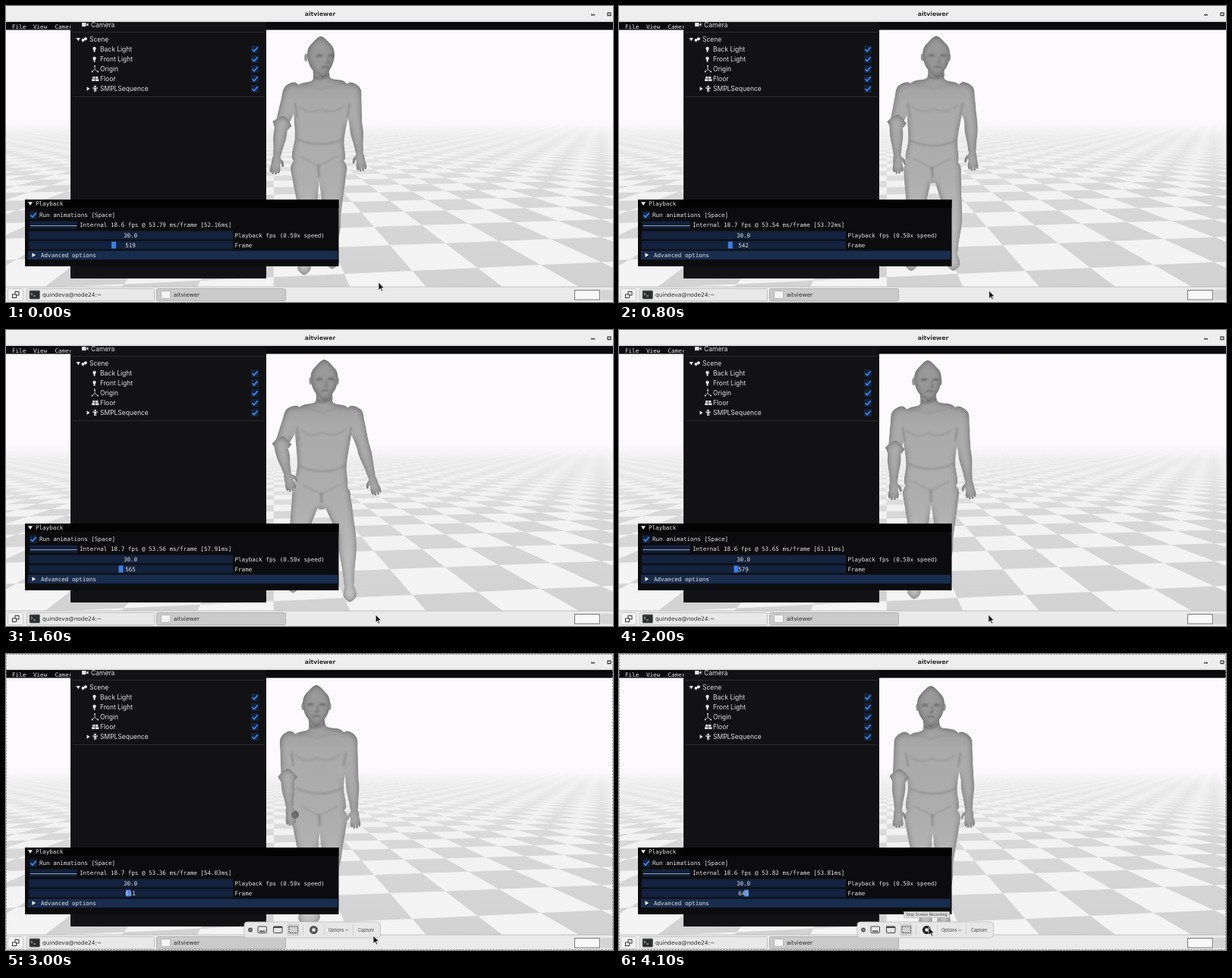
An HTML page for the animation above (4200 ms loop, 800x390 px).

```html
<!DOCTYPE html>
<html lang="en">
<head>
<meta charset="utf-8">
<title>aitviewer</title>
<style>
html, body { margin: 0; width: 100%; height: 100%; overflow: hidden; background: #fcfafc; }
svg { display: block; width: 800px; height: 390px; }
.mono { font: 7.57px "DejaVu Sans Mono", monospace; fill: #e6e6e6; }
.tree { font: 8.5px Inter, sans-serif; fill: #dedede; }
.desk { font: 7.4px "DejaVu Sans", sans-serif; fill: #2b2b2b; }
.bar { font: 5.6px Inter, sans-serif; fill: #444; }
</style>
</head>
<body>
<svg id="stage" viewBox="0 0 800 390" xmlns="http://www.w3.org/2000/svg"></svg>
<script>
const LOOP = 4200, STEP = 100;
const stage = document.getElementById('stage');

// ---------- markup helpers ----------
const text = (x, y, s, cls, extra = '') => `<text x="${x}" y="${y}" class="${cls}" ${extra}>${s}</text>`;
const box = (x, y, w, h, fill, extra = '') =>
  `<rect x="${x}" y="${y}" width="${w}" height="${h}" fill="${fill}" ${extra}/>`;
const line = (d, color, w = 1, extra = '') =>
  `<path d="${d}" fill="none" stroke="${color}" stroke-width="${w}" ${extra}/>`;
const shape = (d, fill, extra = '') => `<path d="${d}" fill="${fill}" ${extra}/>`;
const check = (x, y) => box(x, y, 10, 10, '#13233c') +
  line(`M${x + 1.6} ${y + 5.2}l2.4 2.6 4.6-5.6`, '#4088f0', 1.7);

// ---------- floor ----------
function floorPath() {
  const f = 470, high = 2.3, horizon = 140, yaw = 0.1;
  const c = Math.cos(yaw), s = Math.sin(yaw);
  let d = '';
  for (let v = 1; v < 60; v++) {
    for (let u = -55; u < 55; u++) {
      if ((u + v) & 1) continue;
      const pts = [[0, 0], [1, 0], [1, 1], [0, 1]].map(([a, b]) => {
        const z = (u + a) * s + (v + b) * c;
        const x = (u + a) * c - (v + b) * s;
        return [400 + f * x / z, horizon + f * high / z, z];
      });
      if (pts.some(p => p[2] < 2)) continue;
      if (pts.every(p => p[0] < 0) || pts.every(p => p[0] > 800)) continue;
      d += 'M' + pts.map(p => p[0].toFixed(1) + ' ' + p[1].toFixed(1)).join('L') + 'z';
    }
  }
  return d;
}

// ---------- static parts ----------
const defs = `<defs>
<linearGradient id="tile" gradientUnits="userSpaceOnUse" x1="0" y1="155" x2="0" y2="370">
  <stop offset="0" stop-color="#d9d9d9" stop-opacity="0"/><stop offset=".14" stop-color="#dadada" stop-opacity=".45"/>
  <stop offset=".4" stop-color="#d8d8d8"/><stop offset="1" stop-color="#d2d2d2"/></linearGradient>
<linearGradient id="ground" gradientUnits="userSpaceOnUse" x1="0" y1="150" x2="0" y2="370">
  <stop offset="0" stop-color="#fcfafc"/><stop offset=".1" stop-color="#f2f1f2"/><stop offset="1" stop-color="#f5f4f5"/></linearGradient>
<linearGradient id="skin" gradientUnits="userSpaceOnUse" x1="0" y1="40" x2="0" y2="350">
  <stop offset="0" stop-color="#9b9b9b"/><stop offset=".14" stop-color="#979797"/><stop offset=".27" stop-color="#aaa"/>
  <stop offset=".6" stop-color="#aeaeae"/><stop offset="1" stop-color="#c4c4c4"/></linearGradient>
<filter id="vol" x="-15%" y="-15%" width="130%" height="130%" color-interpolation-filters="sRGB">
  <feGaussianBlur in="SourceAlpha" stdDeviation="4" result="b"/>
  <feComposite in="SourceAlpha" in2="b" operator="arithmetic" k2="1" k3="-1"/>
  <feComponentTransfer result="rim"><feFuncA type="linear" slope=".42"/></feComponentTransfer>
  <feMerge><feMergeNode in="SourceGraphic"/><feMergeNode in="rim"/></feMerge></filter>
<filter id="soft" x="-40%" y="-40%" width="180%" height="180%"><feGaussianBlur stdDeviation="1.3"/></filter>
<clipPath id="view"><rect y="31" width="800" height="339"/></clipPath>
<clipPath id="panel"><rect x="85" y="21" width="258" height="338"/></clipPath>
<clipPath id="menu"><rect y="20" width="85" height="12"/></clipPath>
</defs>`;

const scene = box(0, 0, 800, 390, '#fcfafc') + `<g clip-path="url(#view)">` +
  box(0, 150, 800, 220, 'url(#ground)') + shape(floorPath(), 'url(#tile)') + `<g id="body"></g></g>`;

const titleBar = box(0, 0, 800, 20, '#efeeef') + box(0, 19.5, 800, 1, '#cfcfcf') +
  text(414, 13, 'aitviewer', 'desk', 'text-anchor="middle" style="font-weight:700;font-size:7.7px"') +
  box(771, 11, 5, 1.4, '#333') + '<rect x="793" y="9" width="4" height="3.6" fill="none" stroke="#333" stroke-width="1.2"/>' +
  box(0, 21, 800, 10.5, '#0b0b0d') +
  `<g clip-path="url(#menu)">${text(8, 29.5, 'File', 'mono')}${text(36, 29.5, 'View', 'mono')}${text(64.5, 29.5, 'Camera', 'mono')}</g>`;

const bulb = y => `<circle cx="116.5" cy="${y - 1}" r="2.2" fill="#e4e4e4"/>` + box(115.5, y + 1, 2, 2.6, '#e4e4e4');
const icons = {
  'Back Light': bulb, 'Front Light': bulb,
  'Origin': y => line(`M117 ${y - 4}v4.5l-3.6 3M117 ${y + .5}l4 3`, '#cfcfcf', .9) +
    [[117, -4], [113.6, 3.4], [121, 3.4]].map(p => `<circle cx="${p[0]}" cy="${y + p[1]}" r="1" fill="#ddd"/>`).join(''),
  'Floor': y => box(114, y - 3, 3.4, 2.7, '#e0e0e0') + box(118, y - 3, 3.4, 2.7, '#e0e0e0') +
    box(113, y + .3, 4.4, 2.7, '#e0e0e0') + box(118, y + .3, 4.4, 2.7, '#e0e0e0'),
  'SMPLSequence': y => `<circle cx="117.5" cy="${y - 3}" r="1.3" fill="#e4e4e4"/>` +
    line(`M114 ${y - .8}h7M117.5 ${y - 1}v2M116.6 ${y}v4M118.4 ${y}v4`, '#e4e4e4', 1.2) +
    shape(`M106.500 ${y - 2.7}l4 2.7-4 2.7z`, '#e4e4e4')
};
const tree = `<g clip-path="url(#panel)">` + box(85, 21, 258, 338, '#121114') +
  box(100, 22, 5.5, 5, '#e4e4e4') + shape('M105.500 24.500l3-2.300v4.600z', '#e4e4e4') + text(112, 27.5, 'Camera', 'tree') +
  box(88, 34, 252, .8, '#343338') +
  shape('M92.500 42h5.400l-2.700 4.300z', '#e4e4e4') +
  `<circle cx="101.500" cy="45" r="2" fill="#e4e4e4"/><circle cx="104.800" cy="43.300" r="2.100" fill="#e4e4e4"/>` +
  text(110, 47.2, 'Scene', 'tree') +
  Object.keys(icons).map((name, i) => {
    const y = 57 + i * 13;
    return icons[name](y) + text(124, y + 3.2, name, 'tree') + check(323, y - 5);
  }).join('') + box(88, 119, 252, .8, '#343338') + '</g>';

const playback = box(25, 255, 413.5, 88, '#0c0c0f') + box(25, 255, 413.5, 11, '#030304') +
  shape('M29 258.300h6l-3 4.600z', '#eee') + text(39, 263, 'Playback', 'mono') +
  check(31, 270.5) + text(44, 278.3, 'Run animations [Space]', 'mono') +
  box(31, 283.5, 63, 10, '#12203a') + line('M32 289.500h61', '#a9b3c2', .9) +
  `<text id="stats" x="97" y="291.400" class="mono"></text>` +
  box(30, 296.5, 269, 11, '#13223d') + text(164, 304.6, '30.0', 'mono', 'text-anchor="middle"') +
  text(301.5, 304.6, 'Playback fps (0.50x speed)', 'mono') +
  box(30, 309.5, 269, 11, '#13223d') + `<rect id="knob" y="310.500" width="6" height="9" fill="#3d7fe6"/>` +
  `<text id="count" x="164" y="317.700" class="mono" text-anchor="middle"></text>` +
  text(301.5, 317.7, 'Frame', 'mono') +
  box(29, 322.5, 408, 11.5, '#182d4d') + shape('M34.500 325.200l4.600 2.900-4.600 2.900z', '#eee') +
  text(46, 330.8, 'Advanced options', 'mono');

const taskBar = box(0, 370, 800, 20, '#ebeaeb') + box(0, 369.5, 800, 1, '#c2c2c2') +
  '<rect x="2.500" y="372.500" width="20" height="16" rx="2" fill="#f3f3f3" stroke="#c9c9c9"/>' +
  '<rect x="12" y="376.500" width="5" height="4.500" fill="none" stroke="#333"/><rect x="8.500" y="380" width="5" height="4.500" fill="#fff" stroke="#333"/>' +
  '<rect x="27.500" y="372.500" width="168" height="16" rx="2" fill="#e9e8e9" stroke="#c4c4c4"/>' +
  '<rect x="31" y="375" width="13.500" height="11" rx="1" fill="#2b2d2e" stroke="#777" stroke-width=".8"/>' +
  line('M33 378l2 1.500-2 1.500M36 382h3', '#ddd', .8) +
  text(48, 383.3, 'quindeva@node24:~', 'desk') +
  '<rect x="198.500" y="372.500" width="170" height="16" rx="2" fill="#cbcacb" stroke="#b0b0b0"/>' +
  '<rect x="204.500" y="375.500" width="12" height="10" rx="1" fill="#f4f4f4" stroke="#aaa" stroke-width=".8"/>' +
  text(221, 383.3, 'aitviewer', 'desk') +
  '<rect x="749.500" y="374.500" width="33" height="12.500" fill="#f8f8f8" stroke="#777"/>' +
  box(784, 374, 16, 13.5, '#d4d4d4');

const recorder = `<g id="recorder"><rect x=".5" y=".5" width="799" height="389" fill="none" stroke="#8a8a8a" stroke-width="1" stroke-dasharray="2 2"/>
<rect x="314" y="353" width="179.500" height="21" rx="4" fill="#e8e7e8" stroke="#bcbcbc" stroke-width=".8"/>
<circle cx="322" cy="363.500" r="2.900" fill="#555"/>` + line('M321 362.500l2 2m0-2l-2 2', '#eee', .7) +
  box(370.5, 355.5, 16, 16, '#d0d0d0', 'rx="2"') +
  '<g fill="none" stroke="#444"><rect x="332" y="359" width="11.500" height="8.500" rx="1"/><rect x="352.500" y="359" width="11.500" height="8.500" rx="1"/>' +
  '<rect x="373" y="359" width="11.500" height="8.500" stroke-dasharray="2 1.200"/></g>' +
  box(334, 364.5, 7.5, 1.6, '#444') + box(352.5, 359, 11.5, 2, '#444') +
  box(391, 356, .7, 15, '#c4c4c4') + box(419, 356, .7, 15, '#c4c4c4') + box(457, 356, .7, 15, '#c4c4c4') +
  `<circle id="stop" cx="405.500" cy="363.500" r="5.500"/>` + box(403.5, 361.5, 4, 4, '#eee') +
  text(425, 365.6, 'Options', 'bar') + line('M447.500 363l1.600 1.600 1.600-1.600', '#555', .8) + text(464, 365.6, 'Capture', 'bar') +
  `<g id="tip">${box(375.5, 339.5, 60, 8, '#dcdbdc', 'stroke="#aaa" stroke-width=".5"')}
  ${text(405.5, 345.4, 'Stop Screen Recording', 'bar', 'text-anchor="middle" style="font-size:5px"')}</g></g>`;

const pointer = `<path id="pointer" d="M0 0v10.500l2.400-2.200 1.700 3.700 1.600-.7-1.700-3.600h3.300z" fill="#111" stroke="#fff" stroke-width=".7"/>`;

stage.innerHTML = defs + scene + titleBar + tree + playback + taskBar + recorder + pointer;
const el = id => document.getElementById(id);

// ---------- key data ----------
const stand = [398, 275, 430, 275, 392, 334, 429, 326];
const key = (t, head, trunk, left, right, legs = stand) => [t, ...head, ...trunk, ...left, ...right, ...legs];
// head x, y, turn | chest x, pelvis x, y | elbow, wrist | elbow, wrist | knees, ankles
const poses = [
  key(0, [415, 66, .7], [417, 412, 196], [363, 158, 357, 198], [461, 156, 466, 194]),
  key(400, [420, 65, .15], [415, 412, 203], [367, 158, 385, 198], [455, 150, 448, 190],
    [380, 268, 457, 262, 372, 320, 456, 332]),
  key(1100, [417, 66, .25], [418, 413, 196], [364, 155, 355, 196], [469, 152, 477, 195]),
  key(1500, [421, 65, .1], [420, 416, 202], [362, 152, 372, 188], [472, 151, 485, 194],
    [383, 270, 452, 269, 376, 325, 455, 340]),
  key(2000, [407, 66, .35], [410, 411, 197], [363, 159, 362, 200], [455, 158, 461, 199],
    [395, 275, 429, 275, 388, 334, 428, 322]),
  key(2600, [422, 65, .05], [421, 416, 204], [363, 150, 377, 187], [473, 150, 487, 196],
    [382, 270, 453, 270, 378, 325, 457, 345]),
  key(3000, [409, 67, 0], [412, 413, 198], [371, 165, 374, 202], [456, 165, 459, 206],
    [399, 275, 429, 275, 393, 337, 404, 336]),
  key(4100, [411, 68, 0], [414, 413, 198], [369, 165, 368, 205], [459, 165, 461, 205],
    [399, 275, 429, 275, 403, 340, 427, 340])
];
// frame count, ms per frame, last frame ms
const meters = [
  [0, 519, 53.79, 52.16], [400, 534, 53.67, 53.47], [1100, 548, 53.45, 53.91], [2000, 579, 53.65, 61.11],
  [2600, 598, 53.44, 53.46], [3000, 611, 53.36, 54.03], [4100, 645, 53.82, 53.81]
];
const mouse = [
  [0, 491, 364], [400, 488, 375], [1100, 487.5, 375], [2600, 486.5, 375], [3000, 484, 371], [3200, 484, 371], [3700, 408, 360]
];

function sample(keys, t, ease = k => k) {
  const i = keys.findIndex(k => k[0] > t);
  if (i < 0) return keys[keys.length - 1].slice(1);
  const a = keys[i - 1], b = keys[i], k = ease((t - a[0]) / (b[0] - a[0]));
  return a.slice(1).map((v, n) => v + (b[n + 1] - v) * k);
}
const smooth = k => k * k * (3 - 2 * k);
const mix = (a, b, k) => [a[0] + (b[0] - a[0]) * k, a[1] + (b[1] - a[1]) * k];

// ---------- figure ----------
const num = p => p[0].toFixed(1) + ' ' + p[1].toFixed(1);

// closed Catmull-Rom curve
function closed(p) {
  const n = p.length, at = i => p[(i + n) % n];
  let d = 'M' + num(p[0]);
  for (let i = 0; i < n; i++) {
    const [a, b, c, e] = [at(i - 1), at(i), at(i + 1), at(i + 2)];
    d += 'C' + num([b[0] + (c[0] - a[0]) / 6, b[1] + (c[1] - a[1]) / 6]) + ' ' +
      num([c[0] - (e[0] - b[0]) / 6, c[1] - (e[1] - b[1]) / 6]) + ' ' + num(c);
  }
  return d + 'z';
}

// outline around a spine of [point, radius]
function tube(spine) {
  const l = [], r = [], last = spine.length - 1;
  spine.forEach(([p, w], i) => {
    const a = spine[Math.max(0, i - 1)][0], b = spine[Math.min(last, i + 1)][0];
    const m = Math.hypot(b[0] - a[0], b[1] - a[1]) || 1;
    const x = (b[0] - a[0]) / m, y = (b[1] - a[1]) / m;
    if (i === 0) l.push([p[0] - x * w * .8, p[1] - y * w * .8]);
    l.push([p[0] - y * w, p[1] + x * w]);
    r.unshift([p[0] + y * w, p[1] - x * w]);
    if (i === last) l.push([p[0] + x * w * .8, p[1] + y * w * .8]);
  });
  return closed(l.concat(r));
}

function hand(elbow, wrist, side) {
  const ang = Math.atan2(wrist[1] - elbow[1], wrist[0] - elbow[0]);
  const go = (a, d) => [wrist[0] + Math.cos(ang + a) * d, wrist[1] + Math.sin(ang + a) * d];
  let d = tube([[wrist, 4.6], [go(0, 6), 5.8], [go(0, 12), 5.2]]);
  for (const a of [-.3, -.1, .1, .28]) d += tube([[go(a * 1.2, 10), 1.9], [go(a, 18), 1.8], [go(a * .8, 24 - Math.abs(a) * 8), 1.2]]);
  return d + tube([[go(side * .5, 4), 2.4], [go(side * .85, 10), 2], [go(side * .7, 15), 1.4]]);
}

const arm = (s, e, w) => tube([[s, 12], [mix(s, e, .35), 11.5], [mix(s, e, .75), 9.6], [e, 8.6],
  [mix(e, w, .3), 8.6], [mix(e, w, .7), 6.2], [w, 4.6]]);

const leg = (h, k, a) => tube([[h, 18], [mix(h, k, .3), 17.5], [mix(h, k, .7), 14], [k, 11.5],
  [mix(k, a, .3), 11.5], [mix(k, a, .7), 8], [a, 6]]) +
  tube([[[a[0], a[1] - 1], 6], [[a[0] + 1, a[1] + 8], 8.5], [[a[0] + 1, a[1] + 14], 8]]);

function figure(t) {
  const v = sample(poses, t, smooth);
  const [hx, hy, turn, cx, px, py] = v;
  const pt = i => [v[i], v[i + 1]];
  const [eL, wL, eR, wR, kL, kR, aL, aR] = [6, 8, 10, 12, 14, 16, 18, 20].map(pt);
  const sy = hy + 44, sL = [cx - 38, sy], sR = [cx + 38, sy];
  const chest = [cx, sy], hips = [px, py];
  const trunk = tube([
    [[hx, hy + 15], 10], [[(hx + cx) / 2, hy + 30], 12], [[cx, sy - 9], 29], [[cx, sy + 4], 40],
    [mix(chest, hips, .4), 36], [mix(chest, hips, .75), 32.5], [hips, 35], [[px, py + 10], 31]]);
  const legs = leg([px - 18, py + 12], kL, aL) + leg([px + 18, py + 12], kR, aR);
  const skull = tube([[[hx, hy - 16], 12.5], [[hx, hy - 8], 17.3], [[hx, hy + 2], 17.6],
    [[hx + turn, hy + 13], 14.5], [[hx + turn * 3, hy + 22], 8]]);
  const ears = [-1, 1].map(s => `<ellipse cx="${hx + s * 17.5 - turn * 3}" cy="${hy + 2}" rx="2.2" ry="5" fill="#949494"/>`).join('');

  // face and torso shading
  const fx = hx + turn * 8, eye = s => `M${fx + s * 4} ${hy}q${s * 4}-2 ${s * 7.500} .5`;
  const face = line(eye(-1) + eye(1), '#4d4d4d', 3, 'opacity=".55"') +
    line(`M${fx + 1 + turn * 2} ${hy + 1}l${1.5 + turn * 2} 8h-5`, '#5a5a5a', 1.8, 'opacity=".5"') +
    line(`M${fx - 5} ${hy + 15}q5-1.500 10 0`, '#505050', 1.8, 'opacity=".6"') +
    line(`M${hx - 10} ${hy + 27}q10 6 21-3`, '#5c5c5c', 4, 'opacity=".45"');
  const mid = mix(chest, hips, .78);
  const muscle = line(`M${cx - 31} ${sy + 22}q13 12 29 4q16 8 31-5`, '#707070', 2.4, 'opacity=".24"') +
    line(`M${cx - 26} ${sy - 5}q14 1 24 5q12-5 25-5`, '#808080', 2, 'opacity=".28"') +
    line(`M${mid[0] - 30} ${mid[1] - 2}q30 14 61 0`, '#757575', 2.4, 'opacity=".4"') +
    line(`M${cx - 36} ${sy + 18}l3 19M${cx + 36} ${sy + 18}l-3 19`, '#666', 2.4, 'opacity=".4"') +
    line(`M${px - 25} ${py + 2}L${px} ${py + 15}L${px + 25} ${py + 2}`, '#777', 2.2, 'opacity=".26"') +
    line(`M${px} ${py + 13}L${num(mix([px, py + 13], mix(kL, kR, .5), .25))}`, '#666', 3, 'opacity=".42"');
  const mark = t >= 2900 && t <= 3100 ? `<ellipse cx="${wL[0] + 7}" cy="${wL[1] + 10}" rx="5" ry="5" fill="#555" opacity=".7"/>` : '';

  return `<g fill="url(#skin)"><g filter="url(#vol)">` +
    [legs, arm(sR, eR, wR), hand(eR, wR, 1), arm(sL, eL, wL), hand(eL, wL, -1), trunk].map(d => `<path d="${d}"/>`).join('') +
    `</g><g filter="url(#soft)">${muscle}</g>` +
    `<path d="${arm(mix(sL, eL, .92), mix(eL, wL, .12), wL) + hand(eL, wL, -1)}" filter="url(#vol)"/>` + mark + ears +
    `<path d="${skull}" filter="url(#vol)"/><g filter="url(#soft)">${face}</g></g>`;
}

// ---------- playback ----------
function draw(t) {
  el('body').innerHTML = figure(t);
  const [count, ms, last] = sample(meters, t);
  el('stats').textContent = `Internal ${(1000 / ms).toFixed(1)} fps @ ${ms.toFixed(2)} ms/frame [${last.toFixed(2)}ms]`;
  el('count').textContent = Math.round(count);
  el('knob').setAttribute('x', (139 + (count - 519) * .206).toFixed(1));
  const [x, y] = sample(mouse, t, smooth);
  el('pointer').setAttribute('transform', `translate(${x.toFixed(1)} ${y.toFixed(1)})`);
  const show = (id, on) => el(id).setAttribute('visibility', on ? 'visible' : 'hidden');
  show('recorder', t >= 2900);
  show('tip', t >= 4000);
  el('stop').setAttribute('fill', t >= 3700 ? '#1c1c1c' : '#555');
}

let start = performance.now(), shown = -1;
function tick(now) {
  const t = Math.floor((Math.max(0, now - start) % LOOP) / STEP) * STEP;
  if (t !== shown) draw(shown = t);
  requestAnimationFrame(tick);
}
draw(shown = 0);
requestAnimationFrame(tick);
</script>
</body>
</html>
```
